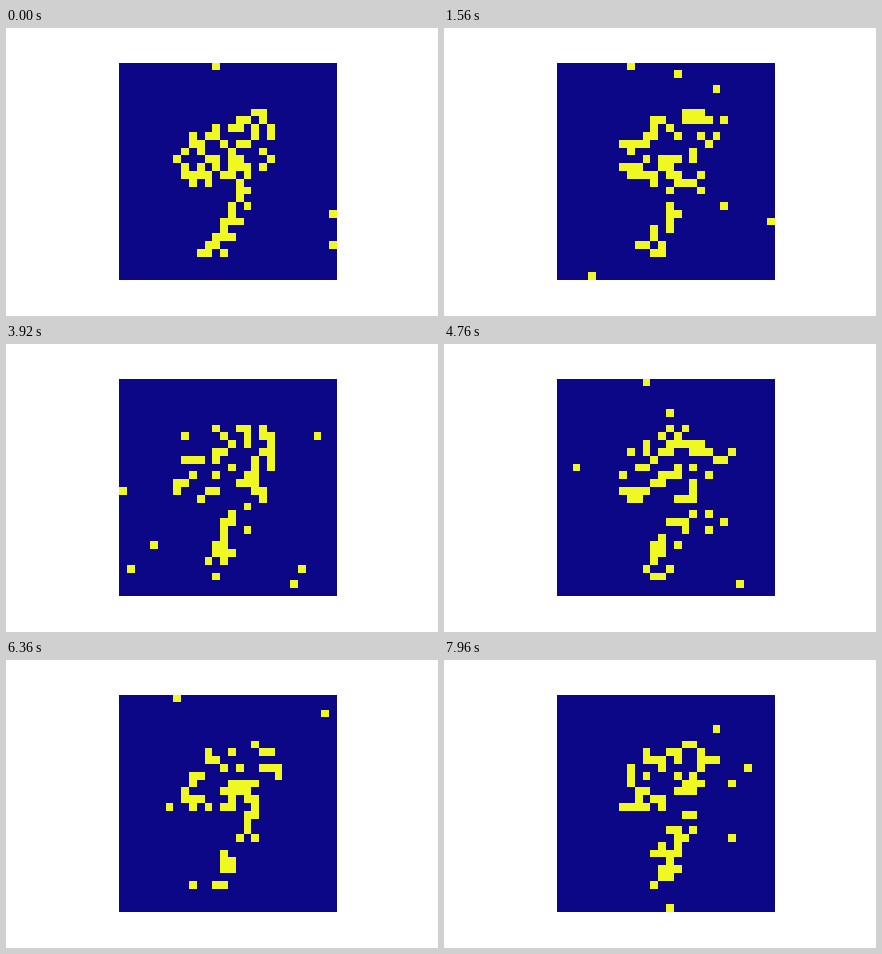
A matplotlib script that plays this animation: 432 px wide and 288 px high, repeating every 8000 ms.

```python
import numpy as np
import matplotlib.pyplot as plt
from matplotlib.animation import FuncAnimation

SIZE, FRAMES, STEP_MS = 28, 200, 40

rows, cols = np.mgrid[:SIZE, :SIZE]
grid = cols + 1j * rows
t = np.linspace(0, 1, 120)


def distance(curve):
    """Distance from every cell to a curve of complex points."""
    return np.abs(grid[..., None] - curve).min(axis=-1)


# Handwritten nine: a tilted ellipse with a bending tail
angle = 2 * np.pi * t
loop = 13.7 + 10.2j + (5.7 * np.cos(angle) + 2.3j * np.sin(angle)) * np.exp(-0.47j)
tail = ((1 - t) ** 2 * (18 + 9.3j) + 2 * t * (1 - t) * (15.7 + 17.5j)
        + t ** 2 * (12.2 + 23.7j))
dist = np.minimum(distance(loop), distance(tail))

# Each cell fires at random: often on the stroke, seldom around it
rate = 0.48 * np.exp(-(dist / 1.6) ** 4) + 0.015 * np.exp(-(dist / 5) ** 2) + 0.007
rng = np.random.default_rng(9)
spikes = (rng.random((FRAMES, SIZE, SIZE)) < rate).astype(float)

fig = plt.figure(figsize=(6, 4), dpi=72, facecolor="white")
ax = fig.add_axes([0.125, 0.125, 0.775, 0.755])
ax.axis("off")
image = ax.imshow(spikes[0], cmap="plasma", vmin=0, vmax=1, interpolation="nearest")


def update(i):
    image.set_data(spikes[i])
    return [image]


anim = FuncAnimation(fig, update, frames=FRAMES, interval=STEP_MS,
                     repeat=True, repeat_delay=0)
plt.show()
```
